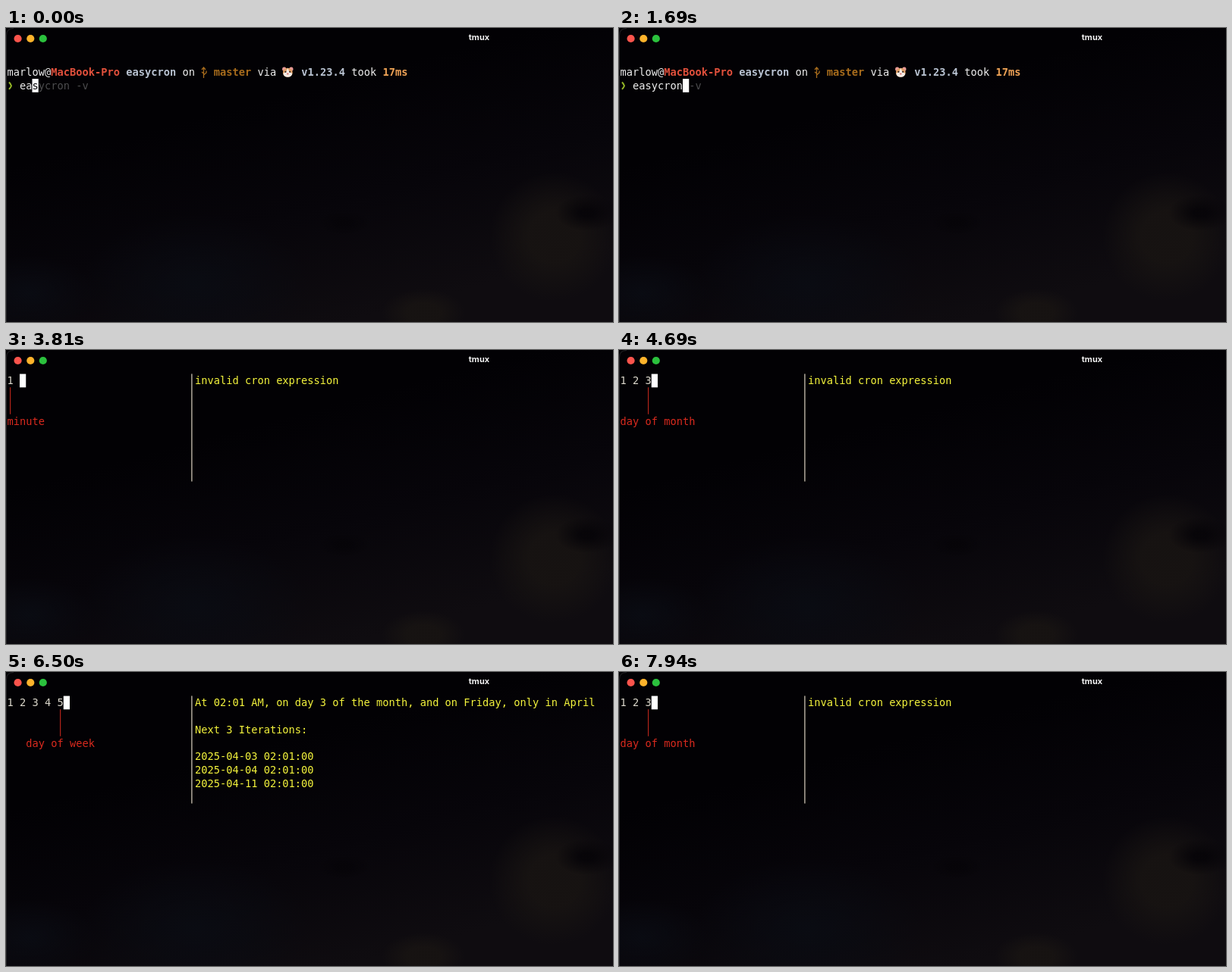
An HTML page that plays this animation: 800x388 px, repeating every 8 s.

```html
<!DOCTYPE html>
<html lang="en">
<head>
<meta charset="utf-8">
<title>tmux</title>
<style>
  html, body { margin: 0; width: 100%; height: 100%; overflow: hidden; background: #020204; }
  svg { display: block; width: 100%; height: 100%; }
  text { white-space: pre; }
  #terminal { font: 13.7px "DejaVu Sans Mono", monospace; }
  .b { font-weight: bold; }
</style>
</head>
<body>
<svg viewBox="0 0 800 388">
  <defs>
    <linearGradient id="base" gradientUnits="userSpaceOnUse" x1="360" y1="90" x2="440" y2="390">
      <stop offset="0" stop-color="#020104"/>
      <stop offset="0.5" stop-color="#07050a"/>
      <stop offset="1" stop-color="#0f0c10"/>
    </linearGradient>
    <radialGradient id="brown">
      <stop offset="0.4" stop-color="#181412" stop-opacity="0.85"/>
      <stop offset="1" stop-color="#181412" stop-opacity="0"/>
    </radialGradient>
    <radialGradient id="blue">
      <stop offset="0" stop-color="#0a0c13" stop-opacity="0.9"/>
      <stop offset="1" stop-color="#0a0c13" stop-opacity="0"/>
    </radialGradient>
    <radialGradient id="dark">
      <stop offset="0.2" stop-color="#060408" stop-opacity="0.9"/>
      <stop offset="1" stop-color="#060408" stop-opacity="0"/>
    </radialGradient>
  </defs>

  <rect width="800" height="388" fill="url(#base)"/>
  <ellipse cx="250" cy="340" rx="150" ry="95" fill="url(#blue)"/>
  <ellipse cx="30" cy="350" rx="90" ry="50" fill="url(#blue)"/>
  <ellipse cx="722" cy="275" rx="85" ry="85" fill="url(#brown)"/>
  <ellipse cx="550" cy="376" rx="55" ry="32" fill="url(#brown)"/>
  <ellipse cx="766" cy="244" rx="42" ry="24" fill="url(#dark)"/>
  <ellipse cx="445" cy="257" rx="34" ry="16" fill="url(#dark)"/>
  <path d="M.5 388V10Q.5 .5 10 .5" fill="none" stroke="#222225"/>

  <circle cx="15.6" cy="14" r="5.1" fill="#fb544c"/>
  <circle cx="32.3" cy="14" r="5.1" fill="#fdb32b"/>
  <circle cx="48.8" cy="14" r="5.1" fill="#2bc13d"/>
  <text x="623.5" y="16" text-anchor="middle" fill="#f2f2f2"
        font-family="Inter, sans-serif" font-size="11" font-weight="700">tmux</text>
  <g id="terminal"></g>
</svg>

<script>
const LOOP = 8000, X0 = 1.5, Y0 = 31.6, CW = 8.25, RH = 17.75;
const YELLOW = '#f4f43c', RED = '#d92a1e', CREAM = '#dcd8cc';
const COMMAND = 'easycron', HINT = 'easycron -v';
const terminal = document.getElementById('terminal');

const shellKeys = [280, 620, 1000, 1230, 1450, 1680];
const OPEN = 2060;
const fieldKeys = [3390, 3690, 3990, 4280, 4570, 4860, 5150, 5440, 5760];
const backKeys = [7090, 7350, 7610, 7870];

// Label and the column it starts in, one per cron field
const fields = [['minute', 0], ['hour', 2], ['day of month', 0], ['month', 6], ['day of week', 3]];

const result = [
  [0, 'At 02:01 AM, on day 3 of the month, and on Friday, only in April'],
  [2, 'Next 3 Iterations:'],
  [4, '2025-04-03 02:01:00'],
  [5, '2025-04-04 02:01:00'],
  [6, '2025-04-11 02:01:00']
];

const colX = col => X0 + col * CW;
const rowY = row => Y0 + row * RH;
const pressed = (keys, t) => keys.filter(k => k <= t).length;

function put(col, row, str, fill, bold = false, dy = 0) {
  return `<text x="${colX(col)}" y="${rowY(row) + 13.8 + dy}" fill="${fill}"${bold ? ' class="b"' : ''}>${str}</text>`;
}

function cursor(col, row, char = '', dy = 0) {
  return `<rect x="${colX(col)}" y="${rowY(row)}" width="${CW}" height="${RH}" fill="#fff"/>` +
    put(col, row, char, '#08080a', false, dy);
}

const branch = `<path d="M260.5 66V52.5M258 55l2.5-3 2.5 3M260.5 62l3.5-3v-2.5M260.5 60l-2.5-2"
  fill="none" stroke="#a86c1c" stroke-width="1.3"/>`;

const hamster = `<g>
  <circle cx="366.7" cy="54.2" r="2.6" fill="#e79a96"/><circle cx="375.9" cy="54.2" r="2.6" fill="#e79a96"/>
  <ellipse cx="371.3" cy="58.8" rx="6.4" ry="6" fill="#e2a267"/>
  <path d="M371.3 53l2 4.5 4 2.5q-.5 4.8-6 4.8t-6-4.8l4-2.5z" fill="#f5ebe4"/>
  <circle cx="368.4" cy="57.8" r="1.1" fill="#30201c"/><circle cx="374.2" cy="57.8" r="1.1" fill="#30201c"/>
  <ellipse cx="371.3" cy="60.5" rx="1.3" ry=".9" fill="#d9706e"/></g>`;

const chevron = '<path d="M4 71.5q2.2 2.3 3 4.7-.8 2.4-3 4.7" fill="none" stroke="#93b526" stroke-width="2"/>';

function shell(typed) {
  const at = typed + 2;
  return put(0, 1, 'marlow@', '#eeeeee') +
    put(7, 1, 'MacBook-Pro', '#e2503c', true) +
    put(19, 1, COMMAND, '#b9c3d2', true) +
    put(28, 1, 'on', '#eeeeee') + branch +
    put(33, 1, 'master', '#a86c1c', true) +
    put(40, 1, 'via', '#eeeeee') + hamster +
    put(47, 1, 'v1.23.4', '#b9c3d2', true) +
    put(55, 1, 'took', '#eeeeee') +
    put(60, 1, '17ms', '#f0a356', true) +
    chevron +
    put(2, 2, HINT.slice(0, typed), '#eeeeee') +
    put(at + 1, 2, HINT.slice(typed + 1), '#4c4c4e') +
    cursor(at, 2, HINT[typed]);
}

function editor(length) {
  const bar = `<path d="M${colX(29.5)} ${rowY(0)}V${rowY(8)}" stroke="#bdb4a6" stroke-width="1.4"/>`;
  if (!length) return bar + put(1, 0, ' * * * *', '#eeeeee', false, 3) + cursor(0, 0, '*', 3);

  const index = (length - 1) >> 1;
  const [label, col] = fields[index];
  const stem = `<path d="M${colX(index * 2 + 0.5)} ${rowY(1)}V${rowY(3)}" stroke="#b3241a" stroke-width="1.2"/>`;
  const output = length === 9 ? result : [[0, 'invalid cron expression']];
  return bar + stem +
    put(0, 0, '1 2 3 4 5'.slice(0, length), CREAM) +
    put(col, 3, label, RED) +
    cursor(length, 0) +
    output.map(([row, line]) => put(30, row, line, YELLOW)).join('');
}

function view(t) {
  return t < OPEN
    ? shell(2 + pressed(shellKeys, t))
    : editor(pressed(fieldKeys, t) - pressed(backKeys, t));
}

let shown = '';
const start = performance.now();
function frame() {
  const next = view((performance.now() - start) % LOOP);
  if (next !== shown) terminal.innerHTML = shown = next;
  requestAnimationFrame(frame);
}
frame();
</script>
</body>
</html>
```
